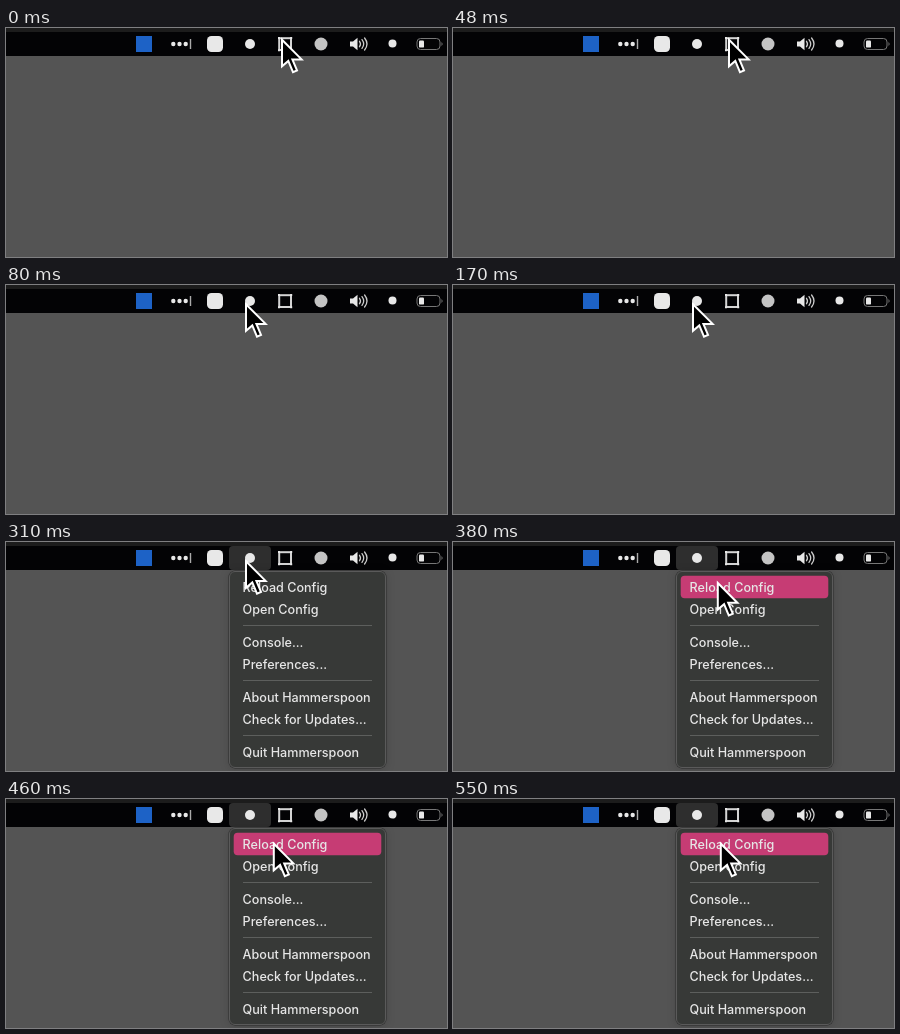
These frames come from a looping animation (441 by 229 pixels, 0.61 s). An HTML page:

```html
<!DOCTYPE html>
<html lang="en">
<head>
<meta charset="utf-8">
<title>Menu bar</title>
<style>
  html, body { margin: 0; width: 100%; height: 100%; overflow: hidden; background: #545454; }
  svg { display: block; width: 100%; height: 100%; }
  text { font: 500 12.6px Inter, sans-serif; fill: #e6e6e6; }
  #menu { filter: drop-shadow(0 1px 4px rgba(0, 0, 0, .15)); }
</style>
</head>
<body>
<svg viewBox="0 0 441 229">
  <rect width="441" height="229" fill="#545454"/>
  <rect width="441" height="28" fill="#030305"/>
  <rect width="441" height="4" fill="#1c1c1c"/>

  <rect id="pressed" x="223" y="4" width="42" height="24" rx="4" fill="#2e2e2e"/>

  <g fill="#e8e8e8">
    <rect x="130" y="8" width="16" height="16" fill="#1d62c6"/>
    <circle cx="167.3" cy="16" r="2.2"/>
    <circle cx="173.5" cy="16" r="2.2"/>
    <circle cx="179.7" cy="16" r="2.2"/>
    <rect x="183.8" y="11" width="1.4" height="10" fill="#aaa"/>
    <rect x="201" y="8" width="16" height="16" rx="4.5"/>
    <circle cx="244" cy="16" r="5"/>
    <rect x="273.2" y="10.2" width="11.8" height="11.8" fill="none" stroke="#d4d4d4" stroke-width="2"/>
    <path d="M272 9h2v2h-2zM284.2 9h2v2h-2zM272 21.2h2v2h-2zM284.2 21.2h2v2h-2z"/>
    <circle cx="315" cy="16" r="6.5" fill="#c4c4c4"/>
    <path d="M344 13.5h3l4.5-3.8v12.6l-4.5-3.8h-3z"/>
    <path d="M353.5 13.3q2 2.7 0 5.4M356 11.6q3.4 4.4 0 8.8M358.6 10q4.8 6 0 12"
          fill="none" stroke="#ccc" stroke-width="1.3" stroke-linecap="round"/>
    <circle cx="386.5" cy="15.5" r="4"/>
    <rect x="411" y="10.5" width="23" height="11" rx="3.5" fill="none" stroke="#777"/>
    <rect x="413" y="12.4" width="5" height="7.2" rx="1.2"/>
    <path d="M435.5 14q2.2 2 0 4z" fill="#777"/>
  </g>

  <g id="menu">
    <rect x="222.5" y="28.5" width="158" height="198" rx="6.5" fill="#2b2b2b"/>
    <rect x="223.5" y="29.5" width="156" height="196" rx="5.5" fill="#373937" stroke="#5a5a5a"/>
    <rect id="selected" x="227.7" y="33.7" width="147.6" height="22.5" rx="4" fill="#c63c74"/>
    <path d="M237 83.5h129M237 138.5h129M237 193.5h129" stroke="#5d5f5d"/>
    <g id="items"></g>
  </g>

  <circle id="click" cx="238" cy="17" r="13.3" fill="#fff200" fill-opacity=".53"/>
  <path id="cursor" d="M1 2.2V28.8L7.3 23.4 12 34.6 16 32.9 11.4 21.9H20.6Z"
        fill="#000" stroke="#fff" stroke-width="2"/>
</svg>
<script>
const byId = id => document.getElementById(id);

const items = [
  ["Reload Config", 50], ["Open Config", 72],
  ["Console...", 105], ["Preferences...", 127],
  ["About Hammerspoon", 160], ["Check for Updates...", 182],
  ["Quit Hammerspoon", 215]
];
byId("items").innerHTML = items
  .map(([label, y]) => `<text x="236.6" y="${y}">${label}</text>`).join("");

const LOOP = 610;
const pointer = [
  { from: 0, x: 275, y: 9.5 },
  { from: 80, x: 239, y: 17 },
  { from: 380, x: 263.8, y: 38.8 },
  { from: 460, x: 266.8, y: 42.5 }
];

function show(id, visible) {
  byId(id).style.display = visible ? "" : "none";
}

function draw(now) {
  const t = now % LOOP;
  const { x, y } = pointer.findLast(step => t >= step.from);
  byId("cursor").setAttribute("transform", `translate(${x} ${y})`);
  show("click", t >= 230 && t < 310);
  show("pressed", t >= 310);
  show("menu", t >= 310);
  show("selected", t >= 380);
}

let start;
function tick(now) {
  start ??= now;
  draw(now - start);
  requestAnimationFrame(tick);
}
draw(0);
requestAnimationFrame(tick);
</script>
</body>
</html>
```
